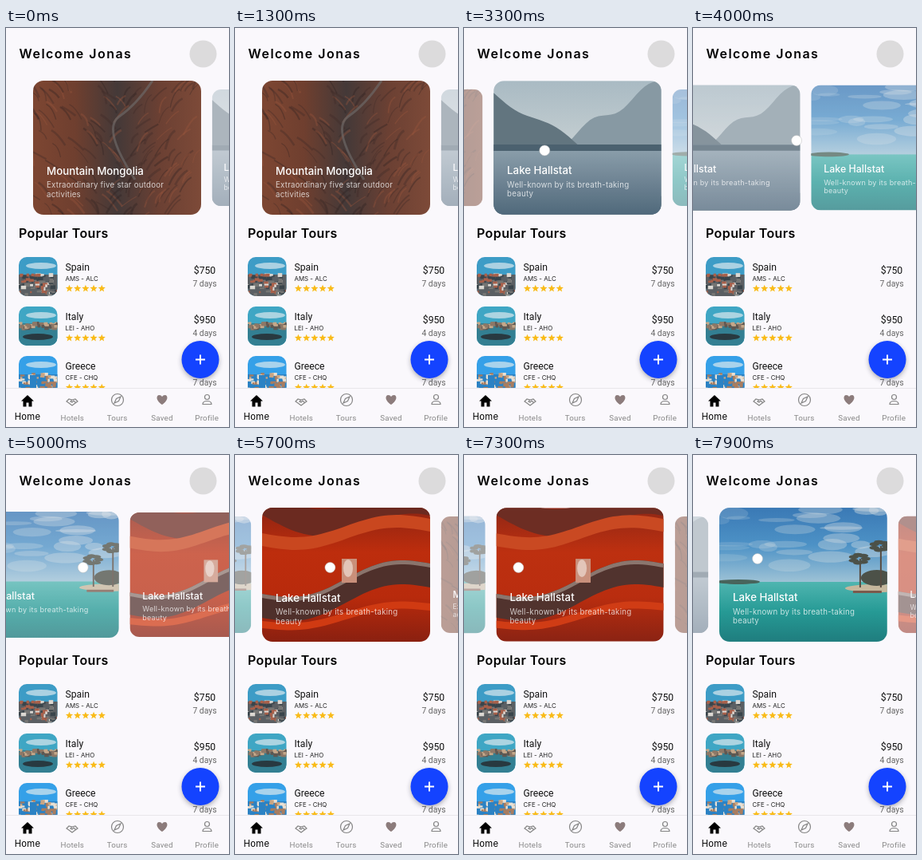
An HTML page that plays this animation: 280 by 500 pixels, repeating every 8000 ms.

```html
<!DOCTYPE html>
<html lang="en">
<head>
<meta charset="utf-8">
<style>
  html, body { margin: 0; width: 100%; height: 100%; overflow: hidden; background: #faf8fc; }
  svg { display: block; font-family: Inter, Roboto, sans-serif; }
  .h1 { font-size: 16px; font-weight: 600; letter-spacing: 1.45px; }
  .h2 { font-size: 16px; font-weight: 600; letter-spacing: .4px; }
  .title { font-size: 13.3px; font-weight: 500; fill: #fff; }
  .sub { font-size: 9.7px; letter-spacing: .24px; fill: #fff; fill-opacity: .75; }
  .name { font: 12.2px Roboto, sans-serif; fill: #111; }
  .code { font-size: 7.9px; fill: #222; }
  .days { font: 10.4px Roboto, sans-serif; fill: #666; }
  .tab { font: 9.8px Roboto, sans-serif; fill: #888; letter-spacing: .2px; }
  .tab.on { font: 11.3px Inter, sans-serif; fill: #000; }
  .mid { text-anchor: middle; }
</style>
</head>
<body>
<svg width="280" height="500" viewBox="0 0 280 500">
  <defs>
    <clipPath id="card"><rect width="211" height="168" rx="13"/></clipPath>
    <clipPath id="thumb"><rect width="48.5" height="49" rx="10"/></clipPath>
    <filter id="soft" x="-50%" y="-50%" width="200%" height="200%"><feGaussianBlur stdDeviation="3"/></filter>
  </defs>
  <rect width="280" height="500" fill="#faf8fc"/>
  <text class="h1" x="16.5" y="38">Welcome Jonas</text>
  <circle cx="247.5" cy="32.5" r="17" fill="#dcdbdc"/>
  <g id="cards"></g>
  <text class="h2" x="16" y="263">Popular Tours</text>
  <g id="rows"></g>
  <rect y="452" width="280" height="48" fill="#faf8fc"/>
  <path d="M0 451.5H280" stroke="#e9e7eb"/>
  <circle cx="244" cy="418" r="23" fill="#223" opacity=".4" filter="url(#soft)"/>
  <circle cx="244" cy="415.5" r="23.5" fill="#1443ff"/>
  <path d="M238 415.5h12M244 409.5v12" stroke="#fff" stroke-width="2"/>
  <g id="tabs"></g>
  <g fill="none" stroke="#858585" stroke-width="1.2">
    <path d="M27 460l-8 7.500h2.500v7h4v-5h3v5h4v-7h2.500z" fill="#000" stroke="none"/>
    <path d="M76 468l3-3 4 1 4-1 3 3-3 2-4 3-4-3zM83 466l-2 2 2 1 2-2 3 3"/>
    <circle cx="140" cy="466" r="7.5"/>
    <path d="M144 462l-2.500 5.500-5.500 2.500 2.500-5.500z"/>
    <path d="M196 472c-9-6-7-12-3.500-12q2.500 0 3.500 2 1-2 3.500-2c3.500 0 5.500 6-3.500 12z" fill="#8c7c7c" stroke="none"/>
    <circle cx="252.500" cy="462.500" r="3"/>
    <path d="M247 471.500q0-4 5.500-4t5.500 4z"/>
  </g>
  <circle id="touch" r="6.5" fill="#fff" stroke="#bbb" stroke-opacity=".5"/>
</svg>
<script>
const $ = id => document.getElementById(id);
const W = 211, H = 168;
let seed = 7;
const rand = (a, b) => a + (b - a) * ((seed = seed * 16807 % 2147483647) / 2147483647);
const pick = list => list[Math.floor(rand(0, list.length))];
const repeat = (n, f) => Array.from({ length: n }, (_, i) => f(i)).join('');

const box = (fill, y, h, x = 0, w = W) => `<rect x="${x}" y="${y}" width="${w}" height="${h}" fill="${fill}"/>`;
const blob = (fill, x, y, rx, ry, o = 1) =>
  `<ellipse cx="${x}" cy="${y}" rx="${rx}" ry="${ry}" fill="${fill}" opacity="${o}"/>`;

let gradients = 0;
function fade(y, h, colors, sideways) {
  const id = 'fade' + gradients++;
  const stops = colors.map((c, i) => `<stop offset="${i / (colors.length - 1)}" stop-color="${c}"/>`).join('');
  return `<linearGradient id="${id}" ${sideways ? '' : 'x2="0" y2="1"'}>${stops}</linearGradient>` + box(`url(#${id})`, y, h);
}

// A wavy strip from the left edge (y) to the right edge (y + slope).
function strip(fill, y, slope, wave, turns, thick = H) {
  const edge = Array.from({ length: 41 }, (_, i) => {
    const p = i / 40;
    return [p * W, y + slope * p + wave * Math.sin(p * turns * 2 * Math.PI)];
  });
  const lower = edge.map(([x, top]) => [x, top + thick]).reverse();
  return `<polygon points="${edge.concat(lower).map(q => q.map(v => v.toFixed(1))).join(' ')}" fill="${fill}"/>`;
}

const clouds = (n, low) => repeat(n, () => {
  const x = rand(0, W);
  return blob('#d3dce0', x, rand(0, low), rand(10, 30), rand(2, 8), .15 + .3 * x / W);
});
const palm = (x, y) => box('#584c42', y, 100 - y, x, 2) + repeat(7, i =>
  blob('#4c5148', x + 8 * Math.cos(i * .9), y + 5 * Math.sin(i * .9), 6, 2.5));

const mountain = fade(0, H, ['#7d4632', '#6f3f2f', '#443938', '#6b4033', '#7d4a38'], true) +
  repeat(150, () => {
    const x = rand(-10, W), y = rand(-10, H), side = x < W / 2 ? 1 : -1;
    return `<path d="M${x} ${y}q${side * 8} 4 ${side * rand(8, 20)} ${rand(10, 24)}" fill="none"
      stroke="${pick(['#2c2220', '#9a583c', '#3d2a26'])}" stroke-width="${rand(1, 3)}" opacity=".35"/>`;
  }) +
  '<path d="M150 0Q130 30 108 45T128 124" fill="none" stroke="#6d6765" stroke-width="3" opacity=".7"/>';

const fjord = fade(0, 80, ['#a9bac3', '#c4ced1']) +
  strip('#8799a3', 130, -130, 6, 3) + strip('#61747f', 15, 130, 5, 2) +
  fade(80, 88, ['#8fa2ae', '#4f687b']) + strip('#4a606e', 80, 0, 0, 1, 8);

const beach = fade(0, 94, ['#3a79b5', '#4d92c6', '#9fc3d6']) + clouds(26, 75) +
  fade(93, 75, ['#4fb5b0', '#269a95', '#1f7d7e']) + blob('#48645b', 24, 93, 27, 3) +
  blob('#c5b79d', 200, 101, 42, 5) + blob('#4c5148', 198, 88, 20, 10) + palm(176, 64) + palm(202, 48) +
  box('#7b5a4c', 104, 3, 168, 36);

const canyon = fade(0, H, ['#8f2412', '#bd2d0d', '#b82a0c', '#8a2010']) +
  strip('#6b2a20', -25, 20, 20, .8, 34) + strip('#c9471f', 32, -18, 9, 1, 16) +
  strip('#4f302b', 108, -38, 12, 1, 30) + strip('#8a746c', 108, -38, 12, 1, 5) +
  strip('#d03a12', 142, -22, 7, 1, 9) + box('#c98f7a', 64, 30, 100, 19) + blob('#e3c5b8', 108, 76, 6, 11);

const lakeText = ['Lake Hallstat', 'Well-known by its breath-taking', 'beauty'];
const mountainText = ['Mountain Mongolia', 'Extraordinary five star outdoor', 'activities'];
const deck = [[mountain, mountainText], [fjord, lakeText], [beach, lakeText], [canyon, lakeText]];
deck.push(deck[0], deck[1]);
$('cards').innerHTML = deck.map(([art, [title, one, two]]) => `<g><g clip-path="url(#card)">${art}</g>
  <text class="title" x="17" y="117.500">${title}</text>
  <text class="sub" x="17" y="134">${one}</text><text class="sub" x="17" y="145.500">${two}</text></g>`).join('');

const village = (sky, ground, tones, top, bottom) => box(sky, 0, 49) + blob('#dbe8ee', 28, 11, 19, 4, .7) +
  box(ground, top + 2, 49) + repeat(70, () =>
    box(pick(tones), rand(top, bottom), rand(2, 5), rand(-2, 48), rand(2, 7)));
const town = village('#3d9cc6', '#5b5f63', ['#dcd8d2', '#a9604a', '#767674', '#39444b'], 20, 45);
const harbour = village('#3fa6c4', '#337f92', ['#8d7867', '#c5a88a', '#5f5751'], 19, 25) + blob('#283940', 24, 38, 19, 4);
const cliff = village('#35a0e8', '#2b82c4', ['#e8e0d4', '#c9a583', '#a87d60'], 21, 46) + box('#2b82c4', 24, 25, 14, 8);

const star = 'M' + Array.from({ length: 10 }, (_, i) => {
  const r = i % 2 ? 2.1 : 4.8, a = i * Math.PI / 5;
  return [r * Math.sin(a), -r * Math.cos(a)].map(v => v.toFixed(2)).join(' ');
}).join('L') + 'Z';
const tours = [
  [town, 'Spain', 'AMS - ALC', '$750', '7 days'],
  [harbour, 'Italy', 'LEI - AHO', '$950', '4 days'],
  [cliff, 'Greece', 'CFE - CHQ', '', '7 days']
];
$('rows').innerHTML = tours.map(([art, name, code, price, days], i) => `<g transform="translate(0 ${287 + 62 * i})">
  <g transform="translate(16)"><g clip-path="url(#thumb)">${art}</g></g>
  <text class="name" x="74.500" y="17">${name}</text><text class="code" x="74.500" y="30">${code}</text>
  ${repeat(5, k => `<path d="${star}" transform="translate(${79.5 + 10.2 * k} 39.500)" fill="#f9bb18"/>`)}
  <text class="name mid" x="249.500" y="20.500">${price}</text><text class="days mid" x="249.500" y="37">${days}</text></g>`).join('');
$('tabs').innerHTML = ['Home', 'Hotels', 'Tours', 'Saved', 'Profile'].map((label, i) =>
  `<text class="tab mid ${i ? '' : 'on'}" x="${27 + 56.3 * i}" y="${i ? 491.5 : 490.5}">${label}</text>`).join('');

const SWIPE = 700, DRAG = 420, REACH = 110, SHOW = 2500;
const swipes = [
  { start: 2650, step: 1, x: 143, y: 160 },
  { start: 3655, step: 1, x: 231, y: 141 },
  { start: 4670, step: 1, x: 194, y: 141 },
  { start: 5750, step: 1, x: 120, y: 141 },
  { start: 6340, step: -1, x: 56, y: 141 },
  { start: 7230, step: -1, x: 60, y: 141 },
  { start: 7880, step: 0, x: 81, y: 130 }
];
const ease = (t, start, length) => {
  const p = Math.min(1, Math.max(0, (t - start) / length));
  return p * p * (3 - 2 * p);
};
const position = t => swipes.reduce((sum, s) => sum + s.step * ease(t, s.start, SWIPE), 0);

// The finger drags against the step, then glides to the next grab point.
function finger(t) {
  let { x, y } = swipes[0];
  swipes.forEach((s, i) => {
    x -= s.step * REACH * ease(t, s.start, DRAG);
    const next = swipes[i + 1], lift = s.start + DRAG;
    if (!next) return;
    const glide = ease(t, lift, next.start - lift);
    x += (next.x - s.x + s.step * REACH) * glide;
    y += (next.y - s.y) * glide;
  });
  return `${x} ${y}`;
}

const cards = [...$('cards').children];
function draw(now) {
  const t = now % 8000, pos = position(t);
  cards.forEach((card, i) => {
    const off = i - pos, d = Math.min(1, Math.abs(off));
    card.setAttribute('transform',
      `translate(${139.5 + W * off} 150) scale(${1 - .13 * d}) translate(${-W / 2} ${-H / 2})`);
    card.setAttribute('opacity', 1 - .5 * d);
  });
  $('touch').setAttribute('transform', `translate(${finger(t)})`);
  $('touch').setAttribute('opacity', t < SHOW ? 0 : 1);
  requestAnimationFrame(draw);
}
draw(performance.now());
</script>
</body>
</html>
```
